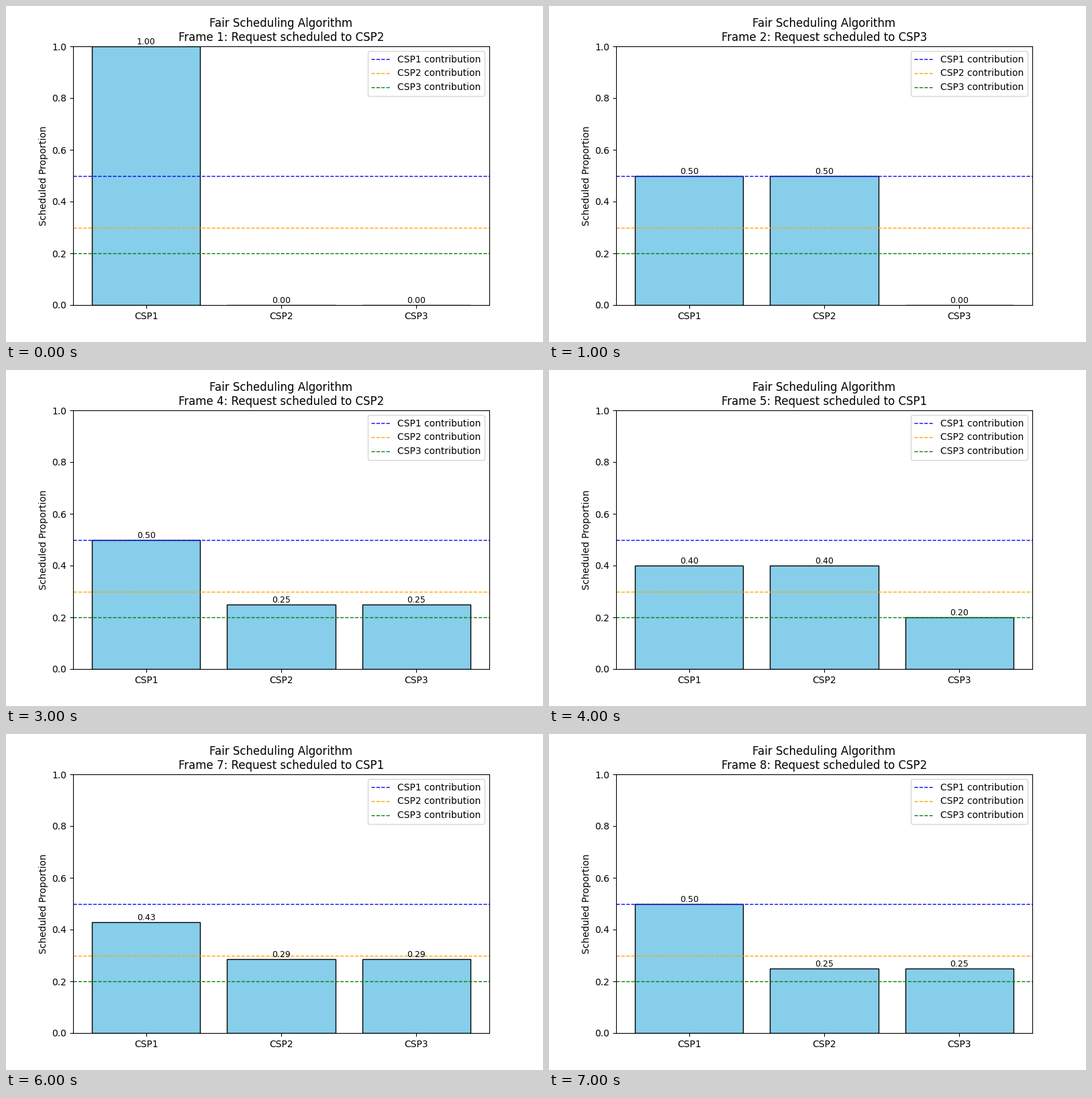
Animation of 800 by 500 pixels, one loop 8 s. Source, as a matplotlib script:

```python
import matplotlib.pyplot as plt
from matplotlib.animation import FuncAnimation

NAMES = ["CSP1", "CSP2", "CSP3"]
SHARES = [0.5, 0.3, 0.2]
COLORS = ["blue", "orange", "green"]
STEPS = 8


def next_provider(counts):
    """Pick the provider with the least load relative to its share."""
    return min(range(len(counts)), key=lambda i: counts[i] / SHARES[i])


def schedule(total):
    """Request counts per provider after `total` requests."""
    counts = [0] * len(NAMES)
    for _ in range(total):
        counts[next_provider(counts)] += 1
    return counts


fig, ax = plt.subplots(figsize=(8, 5), dpi=100)
bars = ax.bar(NAMES, [0] * len(NAMES), color="skyblue", edgecolor="black")
labels = [ax.text(i, 0, "", ha="center", va="bottom", fontsize=9)
          for i in range(len(NAMES))]
for name, share, color in zip(NAMES, SHARES, COLORS):
    ax.axhline(share, color=color, linestyle="--", linewidth=1,
               label=f"{name} contribution")
ax.set_ylim(0, 1)
ax.set_ylabel("Scheduled Proportion")
ax.legend(loc="upper right")


def update(step):
    total = step + 1
    counts = schedule(total)
    for bar, label, count in zip(bars, labels, counts):
        part = count / total
        bar.set_height(part)
        label.set_y(part)
        label.set_text(f"{part:.2f}")
    target = NAMES[next_provider(counts)]
    ax.set_title("Fair Scheduling Algorithm\n"
                 f"Frame {total}: Request scheduled to {target}")
    return [*bars, *labels, ax.title]


anim = FuncAnimation(fig, update, frames=STEPS, interval=1000,
                     repeat=True, repeat_delay=0, blit=False)
plt.show()
```
